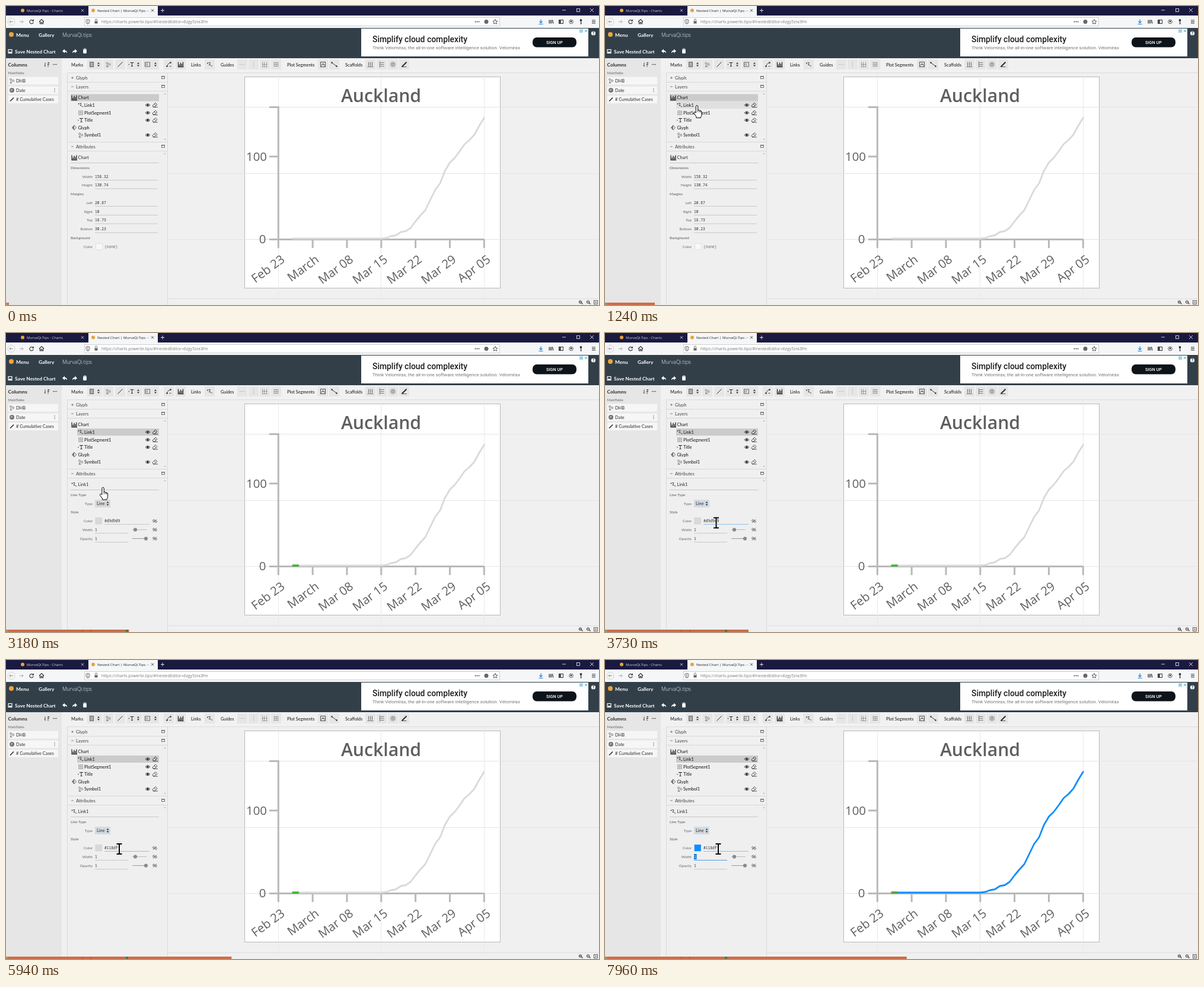
These frames come from a looping animation (1000x504 px, 8 s). An HTML page with a canvas:

```html
<!DOCTYPE html>
<html lang="en">
<head>
<meta charset="utf-8">
<title>Chart editor</title>
<style>
html, body { margin: 0; width: 100%; height: 100%; overflow: hidden; background: #f0f0f0 }
canvas { display: block; width: 1000px; height: 504px }
</style>
</head>
<body>
<canvas id="stage" width="1000" height="504"></canvas>
<script>
const g = document.getElementById('stage').getContext('2d');
const LOOP = 8000;
const INK = '#2b2b2b', GREY = '#666', BLUE = '#118dff';
const ui = (size, weight = 400) => `${weight} ${size}px Lato, sans-serif`;
const open = (size, weight = 400) => `${weight} ${size}px "Open Sans", sans-serif`;
const roboto = (size, weight = 400) => `${weight} ${size}px Roboto, sans-serif`;
const MONO = '6.25px "Noto Sans Mono", monospace';

function text(s, x, y, font, color = INK, align = 'left') {
  g.font = font; g.fillStyle = color; g.textAlign = align;
  g.fillText(s, x, y);
}
function rect(x, y, w, h, color) { g.fillStyle = color; g.fillRect(x, y, w, h); }
function frame(x, y, w, h, color, line = 1) {
  g.strokeStyle = color; g.lineWidth = line; g.strokeRect(x, y, w, h);
}
function dot(x, y, r, color) {
  g.fillStyle = color; g.beginPath(); g.arc(x, y, r, 0, 7); g.fill();
}
function ring(x, y, r, color, line = .8) {
  g.strokeStyle = color; g.lineWidth = line; g.beginPath(); g.arc(x, y, r, 0, 7); g.stroke();
}
// Path given relative to (x, y)
function path(d, x, y, stroke, line = 1, fill) {
  const p = new Path2D(d);
  g.save(); g.translate(x, y);
  if (fill) { g.fillStyle = fill; g.fill(p); }
  if (stroke) { g.strokeStyle = stroke; g.lineWidth = line; g.stroke(p); }
  g.restore();
}
function round(x, y, w, h, r, color) {
  g.fillStyle = color; g.beginPath(); g.roundRect(x, y, w, h, r); g.fill();
}

const icons = {
  link(x, y) { dot(x - 3.5, y - 2, .9, INK); path('M-2-3H1L-1 1H2M2 2.5H4.5', x, y, INK, .8); },
  bars(x, y) { path('M-4-4V4H5M-2 3V0M0 3V-3M2 3V-1M4 3V-4', x, y, INK, 1.3); },
  grid(x, y) { path('M-4-3H4M-4 0H4M-4 3H4M-3-4V4M0-4V4M3-4V4', x, y, '#777', .6); },
  title(x, y) { dot(x - 4, y, .8, INK); path('M-2-3H4M1-3V3M-.5 3H2.5', x, y, INK, 1); },
  glyph(x, y) { path('M0-4L3.5 0L0 4L-3.5 0Z', x, y, '#444', .8); path('M0-4L0 4L-3.5 0Z', x, y, null, 0, '#777'); },
  symbol(x, y) { ring(x - 2, y - 2, 1.5, GREY); ring(x + 2, y, 1.6, GREY); path('M-2 1L0 4H-3Z', x, y, GREY, .8); },
  line(x, y) { path('M-4 4L4-4', x, y, INK, 1); },
  rect(x, y) { rect(x - 3, y - 4, 6, 8, '#aaa'); frame(x - 3, y - 4, 6, 8, '#666'); },
  image(x, y) { frame(x - 4, y - 3.5, 8, 7, '#444', .8); ring(x - 1, y, 1.5, GREY); },
  chain(x, y) { dot(x - 3, y + 3, 1.3, INK); dot(x + 3, y - 3, 1.3, INK); path('M-3 3L-1-1L3-3M1 3H4', x, y, INK, .8); },
  guideH(x, y) { path('M-5 0H5', x, y, '#bbb', .7); },
  guideV(x, y) { path('M0-5V5', x, y, '#bbb', .7); },
  axisX(x, y) { path('M-4-4V4H4M-4 0H4M-1-4V4M3-4V4', x, y, '#888', .8); },
  plot(x, y) { frame(x - 4, y - 4, 8, 8, '#555'); path('M-3 3L0-2L3 3M-2 0H3', x, y, '#555', .8); },
  segment(x, y) { dot(x - 4, y - 3, 1.2, INK); dot(x + 4, y + 3, 1.2, INK); path('M-4-3L4 3', x, y, INK, .9); },
  columns(x, y) { path('M-5 4H5M-3-4V3M0-4V3M3-4V3', x, y, '#777', 1.2); },
  rows(x, y) { path('M-3-5V5M-2-3H4M-2 0H4M-2 3H4', x, y, '#777', 1.2); },
  spiral(x, y) { ring(x, y, 4, '#777'); ring(x, y, 1.8, '#777', 1.2); },
  pen(x, y) { path('M-4 4L4-4', x, y, INK, 2); path('M-4 4H4', x, y, INK, .8); }
};

function arrows(x, y) { path('M-2-1L0-3.5L2-1ZM-2 1L0 3.5L2 1Z', x, y, null, 0, INK); }
function eye(x, y) {
  path('M-4 0Q0-4.5 4 0Q0 4.5-4 0Z', x, y, INK, .8); dot(x, y, 1.8, INK);
}
function eraser(x, y) { path('M-4 1L1-4L4-1L0 3H-3ZM-1-2L2 1M-3 3.5H5', x, y, INK, .8); }
function bind(x, y) {
  ring(x - 1.7, y - .8, 1.6, '#444'); ring(x + 1.7, y + .8, 1.6, '#444');
  path('M-3 3L3-3', x, y, '#444', .7);
}

function browser() {
  rect(0, 0, 1000, 16, '#1a1940');
  rect(139, 0, 117, 16, '#f5f6f7');
  dot(28, 7.5, 3, '#e8a33a'); dot(147, 7.5, 3, '#e8a33a');
  text('MurvaQi.Tips - Charts', 35, 10, open(6.1), '#d5d5dc');
  g.save(); g.beginPath(); g.rect(150, 0, 91, 16); g.clip();
  text('Nested Chart | MurvaQi.Tips - Charts', 154, 10, open(6.1), '#222');
  g.restore();
  const cross = 'M-2-2L2 2M2-2L-2 2';
  path(cross, 129, 7.5, '#ddd', .9); path(cross, 247, 7.5, '#333', .9);
  path('M-3 0H3M0-3V3', 264, 7.5, '#ddd', 1);
  path('M-3 0H3', 941, 7, '#ddd', .9); frame(962.5, 4.5, 5, 5, '#ddd', .9);
  path('M-3-3L3 3M3-3L-3 3', 988, 7, '#ddd', .9);

  rect(0, 16, 1000, 21, '#f5f6f7');
  ring(9, 26.5, 6, '#c9c9cc', .8);
  path('M3 0H-3M-.5-2.5L-3 0L-.5 2.5', 9, 26.5, '#999', 1);
  path('M-3 0H3M.5-2.5L3 0L.5 2.5', 26, 26.5, '#aaa', 1);
  path('M2.6-1.8A3.2 3.2 0 1 0 3.2 1M3.4-3.8V-1.2H.8', 43, 26.5, '#333', 1.1);
  path('M-4 0L0-4L4 0M-2.7-1V3.5H-.8V1H.8V3.5H2.7V-1', 60, 26.5, '#333', 1.1);
  rect(132, 19, 701, 15, '#fff'); frame(132.5, 19.5, 700, 14, '#d0d0d3');
  path('M-3-3L0-4L3-3V0Q3 3 0 4Q-3 3-3 0ZM0-3V3', 138, 26.5, '#555', .9);
  rect(149.5, 25.5, 5, 4, '#666'); path('M-1.5 0V-2A1.5 1.5 0 0 1 1.5-2V0', 152, 25.5, '#666', .9);
  text('https://charts.powerbi.tips/#!nestedEditor=6zgy5zra3fm', 161, 29, open(6.9), '#777');
  [791.5, 794.5, 797.5].forEach(x => dot(x, 26.5, .9, '#333'));
  dot(810, 26.5, 3.5, '#666');
  path('M0-4L1.2-1.3L4-1L1.9.9L2.5 3.8L0 2.3L-2.5 3.8L-1.9.9L-4-1L-1.2-1.3Z', 825, 26.5, '#444', .9);
  path('M0-4V2M-2.5-.5L0 2L2.5-.5M-3.5 4H3.5', 902, 26.5, '#1a7fe0', 1.2);
  path('M-3-3V3M-1-3V3M1-3V3M2.5-3L4 3', 919, 26.5, '#333', 1.1);
  frame(932.5, 23.5, 7, 6, '#333'); rect(933, 24, 3, 5, '#555');
  ring(953, 26.5, 3.3, '#333'); dot(953, 26, 1.5, '#333');
  dot(969.5, 24, 1.9, '#333'); path('M0-2V5M0 3H1.5', 969.5, 26, '#333', 1.1);
  path('M-3-2.5H3M-3 0H3M-3 2.5H3', 991, 26.5, '#333', 1);
}

function header() {
  rect(0, 37, 1000, 51, '#323f49');
  dot(9, 48, 4, '#f0a63c');
  text('Menu', 17, 51.5, ui(8.33, 700), '#fff');
  text('Gallery', 55, 51.5, ui(8.33, 700), '#fff');
  text('MurvaQi.tips', 95, 51.5, open(8.8, 300), '#fff');
  frame(4, 73.5, 6, 6, '#fff', 1.2); rect(5, 77, 4, 3, '#fff');
  text('Save Nested Chart', 15, 79.5, ui(8.33, 700), '#fff');
  const undo = 'M-4 0L0-3.5V-1.3Q4-1 4 3.5Q2.5 1 0 1.2V3.5Z';
  path(undo, 99, 76, null, 0, '#fff');
  g.save(); g.translate(116, 76); g.scale(-1, 1); path(undo, 0, 0, null, 0, '#fff'); g.restore();
  path('M-3-3H3M-1-4H1M-2.3-2V3.5H2.3V-2Z', 133, 76, '#fff', 1, '#fff');

  rect(599, 38, 383, 47, '#fff');
  text('Simplify cloud complexity', 618, 60.5, roboto(13.9, 500), '#1c1c1c');
  text('Think Velomirax, the all-in-one software intelligence solution. Velomirax', 618, 73, roboto(7.9), '#757575');
  round(888, 53, 74, 16.5, 7, '#0d1419');
  text('SIGN UP', 925, 64, roboto(7.3, 500), '#fff', 'center');
  rect(967, 39, 6, 6, '#9fd3e8'); path('M-2-2L2 2M2-2L-2 2', 978, 42, '#38a3cc', .9);
  dot(990.5, 46, 3.6, '#fff'); text('?', 990.5, 48.5, ui(6.5, 900), '#323f49', 'center');
}

function toolbar() {
  rect(94, 88, 906, 24, '#f1f1f1');
  rect(104, 112, 896, 1, '#dcdcdc');
  [['Marks', 110], ['Links', 312], ['Guides', 362], ['Plot Segments', 474], ['Scaffolds', 572]]
    .forEach(([s, x]) => text(s, x, 101.5, ui(7.35, 500), '#222'));
  [['rect', 137, 25], ['symbol', 164], ['line', 184], ['title', 204, 25], ['image', 231, 27], ['chain', 266],
   ['bars', 286], ['link', 335], ['guideH', 390], ['guideV', 409], ['axisX', 428], ['grid', 447], ['plot', 526],
   ['segment', 545], ['columns', 606], ['rows', 625], ['spiral', 644], ['pen', 663]]
    .forEach(([name, x, w = 17]) => {
      rect(x, 90, w, 17, '#e6e6e6');
      icons[name](x + (w > 20 ? 7.5 : w / 2), 98.5);
      if (w > 20) arrows(x + w - 6, 98.5);
    });
}

function columns() {
  rect(0, 88, 94, 416, '#e6e6e6');
  rect(94, 88, 9, 416, '#f0f0f0');
  rect(103, 88, 1, 416, '#dadada');
  text('Columns', 3.5, 102, ui(8.33, 700));
  path('M-3-3V1M-3 1A1 1 0 1 0-2 2M1-3H4L1 0H4M2 1V4', 69, 98.5, '#333', .9);
  [80, 82.5, 85].forEach(x => dot(x, 98.5, .8, INK));
  text('MainTable', 3.5, 114.5, ui(6.25), GREY);
  [['DHB', 126], ['Date', 142], ['# Cumulative Cases', 157.5]].forEach(([s, y], i) => {
    rect(4, y - 6.5, 84, 13, '#f6f6f6');
    text(s, 17, y + 2.7, ui(7.4));
    if (i == 0) icons.symbol(10, y);
    if (i == 1) { dot(10, y, 4, '#777'); path('M0-2V0H-2', 10, y, '#fff', .8); [-2.5, 0, 2.5].forEach(d => dot(82, y + d, .7, GREY)); }
    if (i == 2) path('M-3 3L3-3', 10, y, INK, 1.6);
  });
}

function section(s, y, opened) {
  rect(104, y - 7, 168, 14, '#f0f0f0'); rect(104, y + 7, 168, 1, '#d8d8d8');
  path(opened ? 'M-2 0H2' : 'M-2 0H2M0-2V2', 112, y, GREY, .8);
  text(s, 118, y + 2.6, ui(7.5), '#444');
  frame(262.5, y - 2.5, 5, 4, '#555', .8); path('M-2-1H2', 265, y - 1, '#555', .8);
}

function field(label, value, y) {
  text(label, 146, y + 2.2, ui(6.25), GREY, 'right');
  text(value, 150, y + 2.2, MONO);
}
function rule(x, y, w, color = '#c8c8c8') { rect(x, y, w, 1, color); }
function group(s, y) { text(s, 109, y + 2.2, ui(6.25), '#555'); }

function panel(n) {
  const linked = n >= 26;
  rect(104, 113, 168, 391, '#efefef');
  section('Glyph', 121); section('Layers', 136, true); section('Attributes', 237, true);
  rect(272, 112, 1, 392, '#d8d8d8');
  rule(104, 229, 168, '#d8d8d8');
  path('M-1.5 1L0-1L1.5 1Z', 268, 148, null, 0, '#aaa');
  path('M-1.5 1L0-1L1.5 1Z', 268, 248.5, null, 0, '#aaa');
  path('M-1.5-1L0 1L1.5-1Z', 268, 225, null, 0, '#aaa');

  if (!linked) rect(109, 148.5, 149, 12, '#cbcbcb');
  if (n >= 13) rect(120, 161, 138, 12, linked ? '#cbcbcb' : '#e0e0e0');
  [['Chart', 'bars', 0, 154.5], ['Link1', 'link', 1, 167], ['PlotSegment1', 'grid', 1, 180],
   ['Title', 'title', 1, 192.5], ['Glyph', 'glyph', 0, 205], ['Symbol1', 'symbol', 1, 217.5]]
    .forEach(([s, icon, depth, y]) => {
      icons[icon](115 + depth * 11, y);
      text(s, 121.5 + depth * 10.5, y + 2.7, ui(7.4), '#111');
      if (depth) { eye(239, y); eraser(251, y); }
    });

  icons[linked ? 'link' : 'bars'](115, 255.5);
  text(linked ? 'Link1' : 'Chart', 121.5, 258.2, ui(7.4));
  rule(109, 264, 149);
  if (linked) linkFields(n); else chartFields();
}

function chartFields() {
  group('Dimensions', 273); group('Margins', 317); group('Background', 390.5);
  [['Width', '158.32', 287.5], ['Height', '130.74', 302], ['Left', '20.87', 331.5], ['Right', '10', 346.5],
   ['Top', '18.73', 361], ['Bottom', '30.23', 376]].forEach(([label, value, y]) => {
    field(label, value, y); rule(150, y + 5.5, 106);
  });
  field('Color', '', 405.5);
  rect(151, 400, 12, 11, '#f8f8f8'); frame(151.5, 400.5, 11, 10, '#e2e2e2');
  text('(none)', 166, 407.7, MONO, GREY);
}

function linkFields(n) {
  const focused = n >= 46, selected = n >= 52 && n < 70, pasted = n >= 70, next = n >= 94;
  group('Line Type', 273); group('Style', 302);
  field('Type', '', 287.5);
  rect(150, 281, 26, 13, n >= 45 ? '#d3dbe2' : '#d9d9d9');
  text('Line', 153, 290.1, ui(7.4)); arrows(171.5, 287.5);

  field('Color', '', 317);
  rect(151, 311.5, 10.5, 10.5, n >= 82 ? BLUE : '#d9d9d9');
  frame(151, 311.5, 10.5, 10.5, n >= 82 ? BLUE : '#cfcfcf', .7);
  if (selected) rect(166, 313, 26.5, 8.5, '#0a74d1');
  text(pasted ? '#118dff' : '#d9d9d9', 166, 319.2, MONO, selected ? '#fff' : INK);
  rule(166, 322, 76, focused ? '#8fbfec' : '#c8c8c8');

  field('Width', '', 331.5);
  if (next) rect(150, 327, 4.5, 9, '#0a74d1');
  text('1', 150, 333.7, MONO, next ? '#fff' : INK);
  rule(150, 337, 56, next ? '#4b9be6' : '#c8c8c8');
  field('Opacity', '1', 346.5); rule(150, 352, 56);
  rect(213, 331, 24, 1, '#bbb'); dot(218, 331.5, 3.1, '#8a8a8a');
  rect(213, 346, 24, 1, '#999'); dot(236, 346.5, 3.1, '#8a8a8a');
  [317, 331.5, 346.5].forEach(y => bind(251, y));
}

function chart(n) {
  const LEFT = 459, BASE = 393, WEEK = 57.83, AXIS = '#b9b9b9';
  rect(273, 113, 727, 391, '#f0f0f0');
  rect(402, 119, 432, 357, '#fff'); frame(402.5, 119.5, 431, 356, '#b8b8b8');
  [170, 282, BASE].forEach(y => rect(273, y, 727, 1, '#e4e4e4'));
  [LEFT, 632, 806].forEach(x => rect(x, 113, 1, 380, '#e8e8e8'));
  rect(273, 493, 727, 1, '#dedede');

  text('Auckland', 632.5, 161.5, open(30.2, 600), '#5f5f5f', 'center');
  text('100', 440, 261, open(20.4), '#5f5f5f', 'right');
  text('0', 438.5, 400, open(20.4), '#5f5f5f', 'right');
  path('M444 170.5H459.3V393.5H806M444 253.7H459M444 393.5H459', 0, 0, AXIS, 3);
  ['Feb 23', 'March', 'Mar 08', 'Mar 15', 'Mar 22', 'Mar 29', 'Apr 05'].forEach((s, i) => {
    const x = LEFT + .3 + i * WEEK;
    path('M0 0V15', x, 393, AXIS, 3);
    g.save(); g.translate(x + 12, 430); g.rotate(-.635);
    text(s, 0, 0, open(20.4), '#5f5f5f', 'right');
    g.restore();
  });

  const daily = [391, 388, 386.5, 381, 379.5, 374, 363, 353, 344, 327, 310, 299, 278, 264, 256, 245, 233, 226, 217, 202, 188.5];
  g.lineJoin = 'round'; g.lineCap = 'round';
  path('M484 392H632.8' + daily.map((y, i) => `L${632.8 + (i + 1) * WEEK / 7} ${y}`).join(''), 0, 0, n >= 82 ? BLUE : '#d9d9d9', 2.8);
  if (n >= 26) path('M484 392H492.5', 0, 0, n >= 82 ? '#55a63a' : '#3db82e', 3.6);
  g.lineJoin = 'miter'; g.lineCap = 'butt';

  [969, 982].forEach((x, i) => {
    ring(x - .5, 499, 2.2, '#333', 1); path('M1.2 1.2L3.5 3.5', x, 499, '#333', 1.2);
    path(i ? 'M-1 0H1' : 'M-1 0H1M0-1V1', x - .5, 499, '#333', .7);
  });
  frame(991.5, 496.5, 6, 6, '#444', .8); path('M-1.5-1.5L1.5 1.5M1.5-1.5L-1.5 1.5', 994.5, 499.5, '#444', .8);
}

// Stops of the pointer: step, x, y
const route = [[6, 330, 120], [11, 165, 152], [14, 155, 168], [34, 155, 168], [43, 166, 287], [45, 168, 290],
  [47, 187.5, 320], [50, 187.5, 320], [54, 191, 318.5]];

function pointer(n) {
  if (n < route[0][0]) return;
  const i = route.findIndex(stop => stop[0] > n);
  let [, x, y] = route[route.length - 1];
  if (i > 0) {
    const [a, ax, ay] = route[i - 1], [b, bx, by] = route[i], f = (n - a) / (b - a);
    x = ax + (bx - ax) * f; y = ay + (by - ay) * f;
  }
  if (y > 305) {
    path('M-4.5-8.5H4.5M0-8.5V8.5M-4.5 8.5H4.5', x, y, '#fff', 3);
    path('M-4.5-8.5H4.5M0-8.5V8.5M-4.5 8.5H4.5', x, y, '#000', 2);
  } else {
    g.lineJoin = 'round';
    path('M-1.7 12V1.4A1.7 1.7 0 0 1 1.7 1.4V7.5Q3.6 6.3 4.3 8.2Q6 7.2 6.2 9Q8 8.3 8 11V15Q8 18 6.5 19V20.5H-1V18.5L-5 13Q-5.6 11-4 10.6Q-3 10.6-1.7 12Z', x, y, '#000', 1, '#fff');
    path('M1.7 7.5V11M4.3 8.2V11M6.2 9V11.5', x, y, '#000', .8);
    g.lineJoin = 'miter';
  }
}

function progress(n) {
  const w = 4.94 * (n + 1);
  rect(0, 500, w, 4, '#cd6c48');
  [[0, 4, '#b78a5a'], [128, 2, '#e2502f'], [142, 2, '#e2502f'], [202, 4, '#4d7a48']].forEach(([x, size, color]) => {
    if (x + size <= w) rect(x, 500, size, 4, color);
  });
}

// The picture advances in uneven steps, eleven to each span
const spans = [70, 920, 1800, 2640, 3500, 4340, 5200, 6090, 6930, 7810, 8650];
function stepAt(t) {
  if (t < spans[0]) return 0;
  const k = spans.findIndex(s => s > t) - 1;
  const part = (t - spans[k]) / (spans[k + 1] - spans[k]);
  return 1 + 11 * k + Math.min(10, Math.floor(part * 11 + .35));
}

function draw() {
  const n = stepAt(performance.now() % LOOP);
  chart(n);
  browser();
  header();
  columns();
  toolbar();
  panel(n);
  progress(n);
  pointer(n);
  requestAnimationFrame(draw);
}
draw();
</script>
</body>
</html>
```
